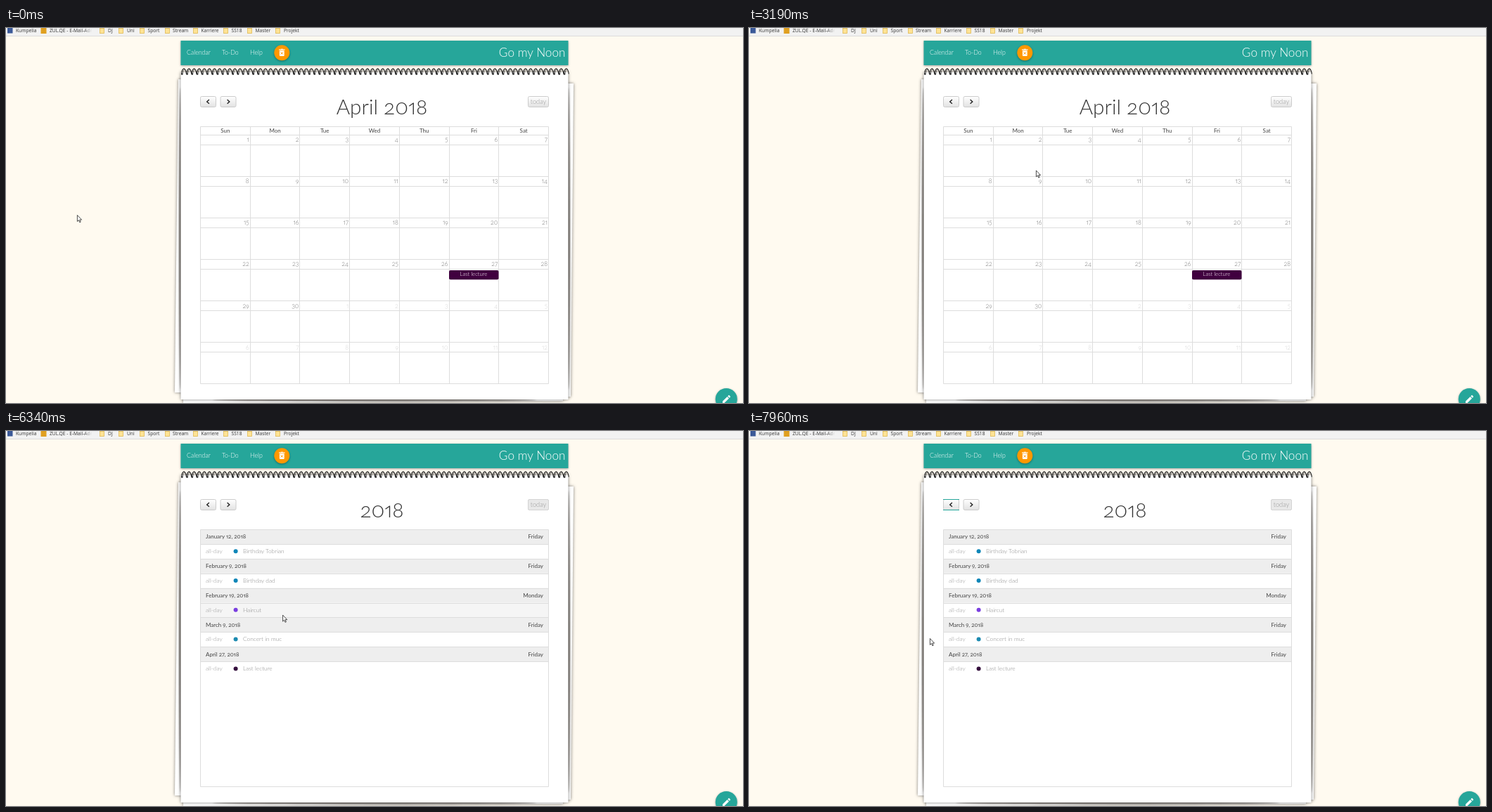
An HTML page that plays this animation: 1048 px wide and 534 px high, repeating every 8 s.

```html
<!DOCTYPE html>
<html lang="en">
<head>
<meta charset="utf-8">
<title>Calendar demo</title>
<style>
  html, body { margin: 0; width: 1048px; height: 534px; overflow: hidden; background: #fffaf0; }
  svg { display: block; }
  text { font-family: Lato, "Open Sans", sans-serif; font-weight: 300; font-variant-numeric: oldstyle-nums proportional-nums; }
  .bar { font-family: "Open Sans", "Noto Sans", sans-serif; font-weight: 400; font-variant-numeric: normal; }
  .mid { font-weight: 400; }
  .sheet { fill: #fff; filter: drop-shadow(0 0 2px rgba(0, 0, 0, .5)); }
  .raised { filter: drop-shadow(0 1px 1.5px rgba(0, 0, 0, .35)); }
  .soft { fill: rgba(30, 20, 10, .6); filter: blur(1.2px); }
  .line { stroke: #ddd; fill: none; }
</style>
</head>
<body>
<svg id="stage" width="1048" height="534" viewBox="0 0 1048 534"></svg>
<script>
const TEAL = '#26a69a';
const rect = (x, y, w, h, fill, more = '') => `<rect x="${x}" y="${y}" width="${w}" height="${h}" fill="${fill}" ${more}/>`;
const path = (d, more = '') => `<path d="${d}" ${more}/>`;
const text = (x, y, str, size, fill, anchor = 'start', cls = '') =>
  `<text x="${x}" y="${y}" font-size="${size}" fill="${fill}" text-anchor="${anchor}" class="${cls}">${str}</text>`;
const group = (id, content) => `<g id="${id}">${content}</g>`;
const repeat = (count, make) => Array.from({ length: count }, (_, i) => make(i)).join('');

function bookmarks() {
  const folders = [[133, 'DJ', 145], [160, 'Uni', 172], [190, 'Sport', 201.5], [226, 'Stream', 237],
    [266, 'Karriere', 277.5], [309, 'SS18', 320.5], [343, 'Master', 354.5], [383, 'Projekt', 395]];
  const label = (x, str) => text(x, 6.3, str, 6.7, '#333', 'start', 'bar');
  return rect(0, 0, 1048, 11, '#f2f2f2') + rect(0, 11, 1048, 1, '#dcdcdc')
    + rect(2, 0, 7.5, 7.5, '#3b5998') + label(14, 'Kumpelia')
    + rect(49.5, 0, 8, 8, '#e0a020') + label(62, 'ZUL.QE - E-Mail-Adr')
    + rect(110, 0, 16, 10, 'url(#fade)')
    + folders.map(([x, name, tx]) =>
      rect(x + .5, .5, 6, 7, '#ffe395', 'stroke="#dfba55" stroke-width=".8"') + label(tx, name)).join('');
}

function paper() {
  const ring = i => {
    const x = 249.5 + i * 7.25;
    return path(`M${x} 65.5C${x + .3} 61 ${x + 2} 57.8 ${x + 3.4} 57.8S${x + 6.6} 61 ${x + 7} 65.5`)
      + path(`M${x + 1.6} 65.5Q${x + 2} 61.5 ${x + 3.6} 59.5`, 'stroke-width=".7"')
      + path(`M${x - .4} 65.6h2.4`, 'stroke-width="2"');
  };
  const shadow = (cx, cy, rx, ry) => `<ellipse cx="${cx}" cy="${cy}" rx="${rx}" ry="${ry}" class="soft"/>`;
  return '<polygon class="sheet" points="253,72 797,68 792,531 252,534"/>'
    + '<polygon class="sheet" points="245,73 807,79 803,525 240,519"/>'
    + shadow(524, 529, 230, 2.5) + shadow(248.5, 300, 2.5, 215) + shadow(799.5, 300, 2.5, 215)
    + rect(248.5, 63, 551, 466, '#fff', 'class="sheet"')
    + `<g fill="none" stroke="#222" stroke-width="1.2">${repeat(76, ring)}</g>`;
}

function header() {
  return rect(248.5, 18, 551, 35, TEAL, 'class="raised"')
    + rect(248.5, 18, 50, 35, '#fff', 'id="calendarHover"') + rect(299, 18, 39, 35, '#fff', 'id="todoHover"')
    + text(257, 38, 'Calendar', 8.8, '#fff') + text(307, 38, 'To-Do', 8.8, '#fff') + text(347, 38, 'Help', 8.8, '#fff')
    + '<circle cx="392.3" cy="35.3" r="11" fill="#ff9800" class="raised"/>'
    + rect(388.9, 32.3, 6.8, 7.7, '#fff', 'rx="1"') + rect(388, 30.4, 8.6, 1.2, '#fff') + rect(390.7, 29.7, 3.2, 1.2, '#fff')
    + path('M390.7 34.3l3.2 3.2m0-3.2l-3.2 3.2', 'stroke="#ff9800"')
    + text(795.5, 41.3, 'Go my Noon', 17.2, '#fff', 'end');
}

function button(id, x, w, content) {
  return group(id, rect(x + .5, 97.5, w - 1, 15, 'url(#button)', 'rx="2" stroke="#ccc"')
    + rect(x, 104, w, 9, TEAL, 'class="hover" visibility="hidden"')
    + path(`M${x} 97.5h${w}m0 15h-${w}`, `class="focus" stroke="${TEAL}" visibility="hidden"`) + content);
}

const chevron = (x, dir) => path(`M${x - 1.6 * dir} 102l${3.2 * dir} 2.9l${-3.2 * dir} 2.9`, 'fill="none" stroke="#222" stroke-width="1.4"');

function calendar() {
  const col = 495 / 7, week = 59.05, left = 276.5;
  const days = ['Sun', 'Mon', 'Tue', 'Wed', 'Thu', 'Fri', 'Sat'];
  const rowLines = repeat(6, i => `M${left} ${Math.round(152 + i * week) + .5}h495m0 14h-495`);
  const colLines = repeat(6, i => `M${Math.floor(left + (i + 1) * col) + .5} 140.5v366`);
  return path(`M${left} 140.5h495v366h-495z${rowLines}${colLines}`, 'class="line"')
    + days.map((d, i) => text(left + (i + .5) * col, 148.7, d, 8, '#444', 'middle', 'mid')).join('')
    + repeat(42, i => text(left + (i % 7 + 1) * col - 1.5, 162.3 + Math.floor(i / 7) * week,
      i < 30 ? i + 1 : i - 29, 8.8, i < 30 ? '#777' : '#d4d4d4', 'end'))
    + rect(630, 345, 70.5, 13.3, '#40003f', 'rx="2"') + text(665, 353.3, 'Last lecture', 7.8, '#fff', 'middle');
}

function list() {
  const events = [['January 12, 2018', 'Friday', 'Birthday Tobrian', '#0f86b8'],
    ['February 9, 2018', 'Friday', 'Birthday dad', '#0f86b8'], ['February 19, 2018', 'Monday', 'Haircut', '#7a3ee0'],
    ['March 9, 2018', 'Friday', 'Concert in muc', '#1c8ab0'], ['April 27, 2018', 'Friday', 'Last lecture', '#350f3d']];
  return rect(277, 0, 494, 20, '#f5f5f5', 'id="rowHover"')
    + events.map(([date, day, name, color], i) => {
      const y = 140 + i * 41.8;
      return rect(277, y, 494, 21, '#eee') + path(`M277 ${Math.round(y) + .5}h494m0 21h-494`, 'class="line"')
        + text(284, y + 13.3, date, 8, '#444', 'start', 'mid') + text(764, y + 13.3, day, 8, '#444', 'end', 'mid')
        + text(284, y + 34, 'all-day', 8.4, '#999') + text(337, y + 34, name, 8.4, '#888')
        + `<circle cx="326.6" cy="${y + 31.2}" r="3" fill="${color}"/>`;
    }).join('') + path('M276.5 140.5h495v366h-495z', 'class="line"');
}

document.getElementById('stage').innerHTML = `<defs>
  <linearGradient id="button" x2="0" y2="1"><stop stop-color="#fff"/><stop offset="1" stop-color="#e2e2e2"/></linearGradient>
  <linearGradient id="fade"><stop stop-color="#f2f2f2" stop-opacity="0"/><stop offset=".8" stop-color="#f2f2f2"/></linearGradient></defs>`
  + bookmarks() + paper() + header()
  + button('prev', 276, 23, chevron(287.3, -1)) + button('next', 304.5, 23, chevron(316.2, 1))
  + button('today', 742, 30, rect(742.5, 97.5, 29, 15, '#e8e8e8', 'id="todayFlat" rx="2" stroke="#d4d4d4"')
    + text(757, 107.8, 'today', 9.2, '#999', 'middle'))
  + '<text id="title" x="534.5" y="123.3" font-size="29.7" fill="#333" text-anchor="middle"></text>'
  + group('calendar', calendar()) + group('list', list())
  + group('empty', rect(276.5, 140.5, 495, 366, '#eee', 'stroke="#ddd"') + text(524, 326, 'No events to display', 8.6, '#777', 'middle'))
  + group('tooltip', rect(322.5, 48.5, 85, 13.5, '#f4f4f4', 'stroke="#888"') + text(325, 58.5, 'Change to to-do view', 8.3, '#666', 'start', 'bar'))
  + `<circle cx="1024.3" cy="528.5" r="15.5" fill="${TEAL}" class="raised"/>`
  + path('M1019 534v-2.4l6.6-6.6l2.4 2.4l-6.6 6.6zM1026.3 524.3l1.2-1.2q.5-.5 1 0l1.4 1.4q.5.5 0 1l-1.2 1.2z', 'fill="#fff"')
  + group('arrow', path('M.4.5V9.5L2.4 7.6L3.8 10.8L5.2 10.2L3.8 7.1H6.6Z', 'fill="#fff" stroke="#222" stroke-width=".8"'))
  + group('hand', path('M-1 7.5V1Q-1 0 0 0T1 1V4.5Q3 4 3.3 5Q5 5 5 6.5V9Q5 11 4 12.3H-.5L-3 8.5Q-3.6 7-2.4 6.8Z', 'fill="#fff" stroke="#222" stroke-width=".8"')
    + path('M1 4.5v2.5M3.1 5v2.2', 'stroke="#222" stroke-width=".7"'));

const LOOP = 8000, START = 310, STEP = 77.27;
// Keyframes: [tick, values...]
const pointer = [[-1, 101, 266], [4, 330, 150], [6, 431, 70], [7, 410, 31], [10, 326, 61], [11, 328, 50], [13, 331, 44],
  [23, 331, 44], [26, 697, 117], [28, 764, 104], [30, 690, 117], [31, 690, 117], [34, 600, 446], [39, 280, 40],
  [42, 318, 33], [44, 316, 37], [48, 316, 37], [52, 200, 120], [55, 84, 260], [59, 239, 327], [61, 395, 337],
  [63, 431, 320], [65, 425, 294], [67, 419, 301], [68, 419, 301], [71, 412, 300], [77, 412, 300], [82, 318, 108],
  [85, 317, 111], [88, 317, 111], [91, 287, 106], [93, 287, 106], [96, 181, 220], [99, 257, 295]];
const todoGlow = [[10, 0], [15, .25], [23, .25], [27, 0], [40, 0], [44, .25], [48, .25], [52, 0]];
const calendarGlow = [[37, 0], [39, .18], [42, 0]];
const tip = [[18, 0], [21, 1], [24, 1], [28, 0]];

function sample(keys, tick) {
  const next = keys.findIndex(k => k[0] > tick);
  if (next === 0) return keys[0].slice(1);
  if (next < 0) return keys.at(-1).slice(1);
  const a = keys[next - 1], b = keys[next], f = (tick - a[0]) / (b[0] - a[0]);
  return a.slice(1).map((v, i) => v + (b[i + 1] - v) * f);
}

const $ = id => document.getElementById(id);
const show = (el, on) => el.setAttribute('visibility', on ? 'visible' : 'hidden');

function draw() {
  const tick = Math.floor((performance.now() % LOOP - START) / STEP + .2);
  const [x, y] = sample(pointer, tick);
  const view = tick < 43 ? 'calendar' : tick >= 84 && tick < 92 ? 'empty' : 'list';
  for (const id of ['calendar', 'list', 'empty']) $(id).style.display = id === view ? '' : 'none';
  $('title').textContent = { calendar: 'April 2018', list: '2018', empty: '2019' }[view];
  show($('todayFlat'), view === 'list');

  const within = (l, t, r, b) => x >= l && x <= r && y >= t && y <= b;
  const onPrev = within(276, 97, 299, 113), onNext = within(304, 97, 328, 113);
  show($('prev').querySelector('.hover'), onPrev);
  show($('next').querySelector('.hover'), onNext);
  show($('prev').querySelector('.focus'), tick >= 92 && !onPrev);

  const row = Math.floor((y - 140) / 41.8), rowTop = 161.5 + row * 41.8;
  show($('rowHover'), row >= 0 && row < 5 && within(277, rowTop, 771, rowTop + 20));
  $('rowHover').setAttribute('y', rowTop);

  $('todoHover').setAttribute('opacity', sample(todoGlow, tick));
  $('calendarHover').setAttribute('opacity', sample(calendarGlow, tick));
  $('tooltip').setAttribute('opacity', sample(tip, tick));

  const hand = onPrev || onNext || within(248, 18, 372, 53) || within(381, 24, 404, 47);
  for (const id of ['arrow', 'hand']) $(id).setAttribute('transform', `translate(${x} ${y})`);
  show($('hand'), hand);
  show($('arrow'), !hand);
  requestAnimationFrame(draw);
}
draw();
</script>
</body>
</html>
```
